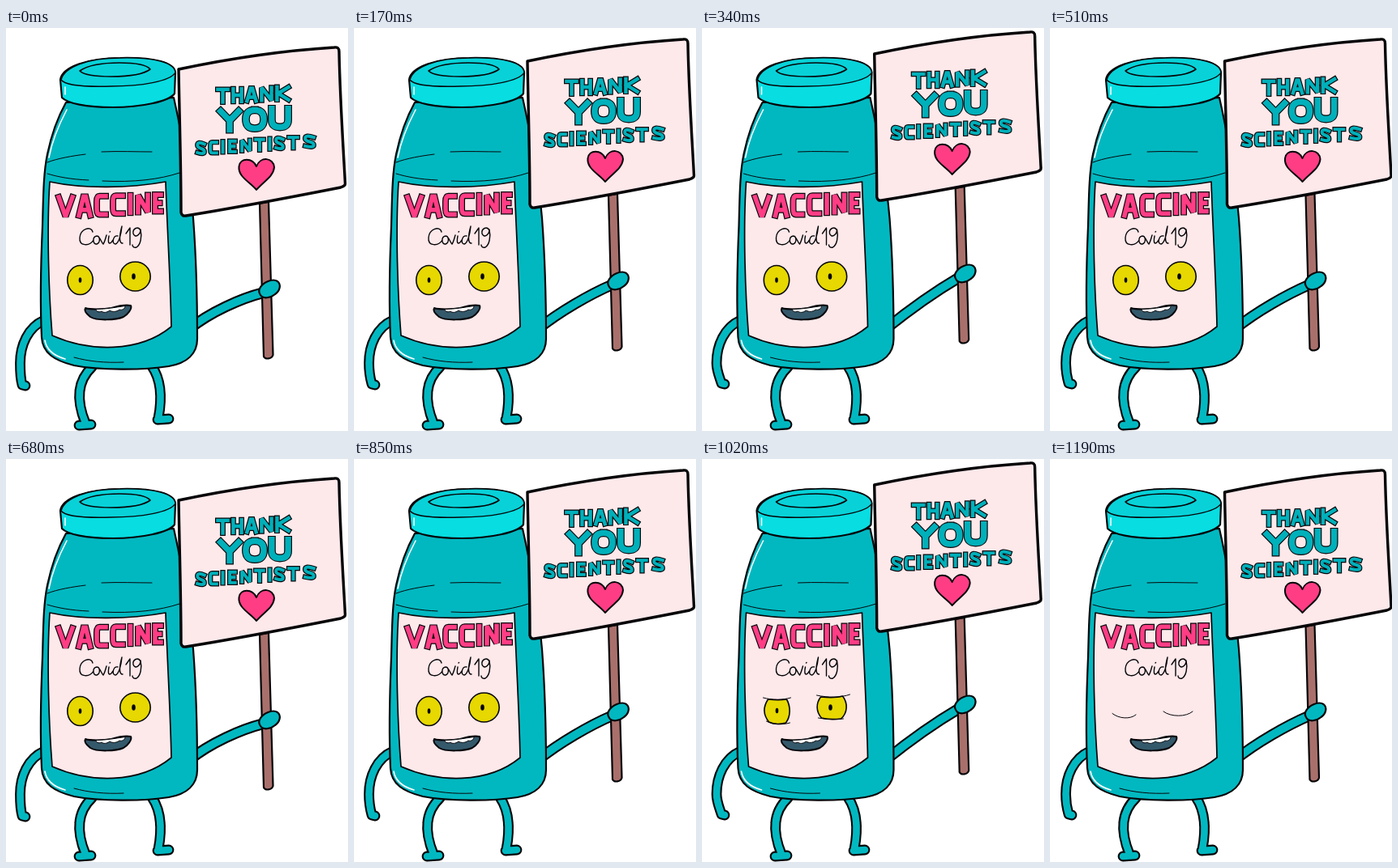
These frames come from a looping animation (422x498 px, 1.36 s). An HTML page:

```html
<!DOCTYPE html>
<html lang="en">
<head>
<meta charset="utf-8">
<title>Thank you scientists</title>
<style>
  html, body { margin: 0; width: 100%; height: 100%; overflow: hidden; background: #fff; }
  svg { display: block; width: 422px; height: 498px; }
  path, ellipse { stroke: #050508; stroke-width: 2.2; stroke-linejoin: round; stroke-linecap: round; }
  .line { fill: none; stroke-width: 1; }
  .shine { fill: none; stroke: #fff; stroke-width: 1.6; }
  .teal { fill: #02b8c0; }
  .paper { fill: #fde8ea; }
  .pink { fill: #ff3d85; }
  .limb path { fill: none; }
  .glyphs path { fill: none; stroke-linecap: square; stroke-linejoin: miter; stroke-miterlimit: 2; }
  .eye { fill: #e6d800; stroke-width: 1.6; }
  .pupil { fill: #050508; stroke: none; }
</style>
</head>
<body>
<svg viewBox="0 0 422 498" role="img" aria-label="Vaccine Covid19 bottle holding a sign: Thank you scientists">
  <g id="legs" class="limb"></g>
  <g id="leftArm" class="limb"></g>
  <g id="rightArm" class="limb"></g>

  <g id="bottle">
    <path class="teal" d="M74 92C64 110 56 132 51 156C46 180 46 210 45 245C43 290 42 340 44 382C45 402 60 411 84 417C115 423 170 423 201 418C224 414 236 402 236 384C236 330 234 275 231 235C227 190 219 140 207 86Z"/>
    <path d="M67 64C69 48 101 37 141 37C184 36 208 43 209 55L208 81C201 91 166 98 132 98C98 98 76 93 69 86Z" fill="#08dde1"/>
    <path d="M68 64C72 48 101 37 141 37C184 36 208 43 209 55C203 66 166 72 130 72C96 73 73 71 68 64Z" fill="#08d2d8" style="stroke-width:1.4"/>
    <path d="M91 53C101 46 120 43 140 43C160 43 174 46 178 51C170 57 152 60 130 60C112 60 96 58 91 53Z" fill="#08d2d8" style="stroke-width:1.6"/>
    <path class="shine" d="M73 73L73 82M75 101C65 120 57 139 53 160M48 386C50 398 59 405 73 409"/>
    <path class="line" d="M51 166C64 161 82 158 98 156M118 153C140 152 160 153 180 153M51 180C64 184 80 187 102 188M119 189C158 191 190 187 214 179M84 407C102 412 122 414 145 413"/>
    <path class="paper" d="M54 190C95 199 153 198 197 190C199 250 203 315 204 369C164 402 102 400 57 380C53 330 50 250 54 190Z" style="stroke-width:1.7"/>
    <g id="title" class="glyphs"></g>
    <path class="line" style="stroke-width:1.4" d="M107 252C105 244 92 248 91 259C90 270 103 270 108 262M112 257C106 258 107 268 112 267C117 265 116 257 112 257M114 258C117 260 118 266 120 267C122 264 123 259 124 256M127 257C126 262 126 266 128 266C130 266 131 263 132 262M128 252L128.5 251.5M138 257C132 256 130 267 135 267C139 266 142 256 143 245C140 256 139 266 144 266M148 254L153 247L153 268M166 250C163 244 156 248 157 254C159 260 166 256 166 249C168 258 166 268 161 271C158 272 156 270 156 268"/>
    <g class="look">
      <ellipse class="eye" cx="91.5" cy="311.5" rx="15.7" ry="18"/>
      <ellipse class="eye" cx="159.5" cy="307" rx="18.7" ry="18"/>
      <ellipse class="pupil" cx="91.5" cy="311.5" rx="1.8" ry="3.2"/>
      <ellipse class="pupil" cx="157.5" cy="307" rx="2.3" ry="3.8"/>
    </g>
    <g class="look">
      <path class="eye" d="M81 297C89 298 98 298 104 297C109 306 109 318 103 326C96 328 88 328 82 325C75 316 75 306 81 297Z"/>
      <path class="eye" d="M146 294C156 295 166 295 173 293C180 302 179 314 171 321C163 322 155 322 147 320C140 312 140 302 146 294Z"/>
      <path class="line" d="M75 295C86 298 99 298 109 295M79 324C87 328 98 329 108 326M141 292C155 295 171 295 182 291M143 320C153 322 165 322 174 321"/>
      <ellipse class="pupil" cx="92" cy="311" rx="1.8" ry="3.2"/>
      <ellipse class="pupil" cx="158" cy="307" rx="2.3" ry="3.8"/>
    </g>
    <g class="look">
      <path class="line" d="M75 314.5C83 321 97 322 104 316M138 312C147 319 166 319 174 312"/>
    </g>
    <path d="M98 346C104 348 120 348 130 346C140 343 149 342 154 343C156 347 150 354 145 357C136 361 112 362 104 357C99 353 96 349 98 346Z" fill="#34596b" style="stroke-width:2"/>
    <path d="M111 347.5C124 347.5 136 345 147 343.5C147 347 143 349 140 348C136 351 131 351 128 349C124 352 120 352 118 350C114 352 111 350 111 347.5Z" fill="#fff" style="stroke-width:1"/>
  </g>

  <g id="sign">
    <path d="M313 217L324 215L329.5 404C328 409 320 410 318 406Z" fill="#a9706b"/>
    <path class="paper" style="stroke-width:3.4" d="M213 51C270 39 340 28 405 24Q411 23 411 29C412 85 416 145 418.5 192Q419 195 413 197C352 209 285 222 222 232Q217 233 216 228C216 170 214 110 213 51Z"/>
    <g id="message" class="glyphs"></g>
    <path class="pink" style="stroke-width:2" d="M309 200C301 190 286 184 287.5 171C289 160 304 160 309 171C314 158 330 160 331 172C330 184 317 190 309 200Z"/>
    <path class="teal" d="M313 322C317 314 329 309 335 313C340 317 338 325 332 329C326 334 317 335 314 330C312 327 312 324 313 322Z"/>
  </g>
</svg>

<script>
const $ = id => document.getElementById(id);

// Letter skeletons in a 10 by 10 box
const glyphs = {
  A: 'M0 10 L4 0 L6 0 L10 10 M2 7 L8 7',
  C: 'M10 0 L3 0 Q0 0 0 3 L0 7 Q0 10 3 10 L10 10',
  E: 'M10 0 L0 0 L0 10 L10 10 M0 5 L8 5',
  H: 'M0 0 L0 10 M10 0 L10 10 M0 5 L10 5',
  I: 'M0 0 L0 10',
  K: 'M0 0 L0 10 M10 0 L1 5 L10 10',
  N: 'M0 10 L0 0 L10 10 L10 0',
  O: 'M5 0 Q10 0 10 5 Q10 10 5 10 Q0 10 0 5 Q0 0 5 0',
  S: 'M10 1 Q0 -2 0 2 Q0 4 5 5 Q10 6 10 8 Q10 11 0 9',
  T: 'M0 0 L10 0 M5 0 L5 10',
  U: 'M0 0 L0 6 Q0 10 5 10 Q10 10 10 6 L10 0',
  V: 'M0 0 L5 10 L10 0',
  Y: 'M0 0 L5 5 L10 0 M5 5 L5 10'
};

const stroke = (d, color, width) => `<path d="${d}" style="stroke:${color};stroke-width:${width}"/>`;
const outlined = (d, color, width, edge) => stroke(d, '#050508', width + edge) + stroke(d, color, width);

// Spans give the outer left and right of each letter; the top and base lines slope
function word(text, spans, { top, height, slope, shrink = 0, width, color }) {
  const half = width / 2 + 1.2;
  const x0 = spans[0][0];
  return [...text].map((ch, i) => {
    const [l, r] = spans[i];
    const y = top + (l - x0) * slope + half;
    const h = height - (l - x0) * shrink - 2 * half;
    const x = ch === 'I' ? (l + r) / 2 : l + half;
    const w = r - l - 2 * half;
    const d = glyphs[ch].replace(/(-?\d+) (-?\d+)/g,
      (_, u, v) => `${(x + u * w / 10).toFixed(1)} ${(y + v * h / 10).toFixed(1)}`);
    return outlined(d, color, width, 2.4);
  }).join('');
}

const teal = '#00b0ba';
$('title').innerHTML = word('VACCINE',
  [[61, 86], [86, 108], [108, 127], [128, 148], [149, 158], [159, 179], [180, 195]],
  { top: 205, height: 32, slope: -.025, shrink: .03, width: 5.6, color: '#ff3d85' });
$('message').innerHTML =
  word('THANK', [[258, 277], [277, 294], [294, 312], [312, 331], [331, 352]],
    { top: 72.5, height: 22.5, slope: -.04, width: 4.4, color: teal }) +
  word('YOU', [[260, 292], [291, 323], [323, 353]],
    { top: 98, height: 32.5, slope: -.05, width: 7.4, color: teal }) +
  word('SCIENTISTS',
    [[233, 248], [249, 263], [264, 271], [273, 286], [288, 304], [305, 321], [322, 329], [330, 345], [346, 363], [366, 383]],
    { top: 139, height: 19.5, slope: -.062, width: 3.9, color: teal });

const limb = (d, width = 8.6) => outlined(d, '#02b8c0', width, 4.2);
$('legs').innerHTML =
  limb('M106 419C87 437 87 461 98 488M90 491L105 490') +
  limb('M180 418C191 434 193 456 188 482M187 484L201 483');

// Body x, sign x and y, free hand x and y
const poses = [
  [0, 0, 0, 0, 0],
  [1, 1, -10, 2, -1],
  [.5, -.3, -19, 4, -2],
  [2, 2.5, -10, 3, -2]
];
const looks = [0, 0, 0, 0, 0, 0, 1, 2];
const STEP = 170;
const eyes = document.querySelectorAll('.look');
let shown = -1;

function draw(step) {
  const [bx, sx, sy, hx, hy] = poses[step % poses.length];
  $('bottle').setAttribute('transform', `translate(${bx})`);
  $('sign').setAttribute('transform', `translate(${sx} ${sy})`);
  $('leftArm').innerHTML = limb(
    `M${47 + bx} 361C${27 + bx} 370 ${17.5 + bx} 392 ${17.5 + bx} 414C${17.5 + bx} 424 ${18 + hx} ${434 + hy} ${20 + hx} ${441 + hy}L${24 + hx} ${442 + hy}`);
  $('rightArm').innerHTML = limb(
    `M${226 + bx} 372C${252 + bx} 351 ${290 + sx} ${334 + sy * .5} ${318 + sx} ${327 + sy}`, 9.6);
  eyes.forEach((eye, i) => { eye.style.display = i === looks[step] ? '' : 'none'; });
}

function tick() {
  const step = Math.floor(performance.now() / STEP) % looks.length;
  if (step !== shown) draw(shown = step);
  requestAnimationFrame(tick);
}
tick();
</script>
</body>
</html>
```
